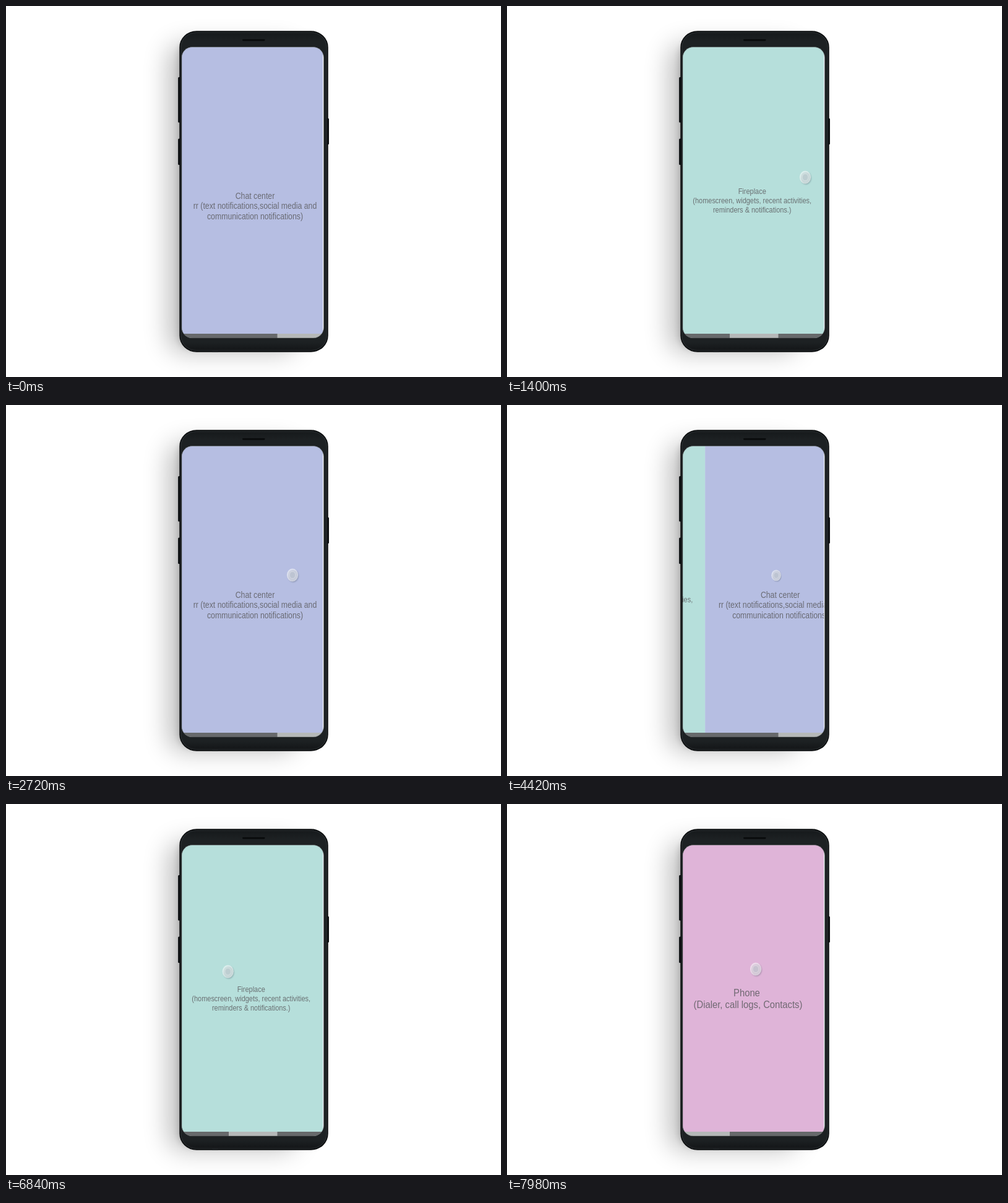
An HTML page that plays this animation: 800 by 600 pixels, repeating every 8 s.

```html
<!DOCTYPE html>
<html lang="en">
<head>
<meta charset="utf-8">
<title>Swipe between phone pages</title>
<style>
  html, body { margin: 0; width: 100%; height: 100%; overflow: hidden; background: #fff; }
  svg { display: block; width: 100vw; height: 100vh; }
  text { font-family: "Liberation Sans", Arial, sans-serif; fill: #5a5a5e; fill-opacity: .84; text-anchor: middle; }
</style>
</head>
<body>
<svg viewBox="0 0 800 600">
  <defs>
    <filter id="wide" x="-50%" y="-30%" width="200%" height="160%"><feGaussianBlur stdDeviation="20"/></filter>
    <filter id="tight" x="-20%" y="-20%" width="140%" height="140%"><feGaussianBlur stdDeviation="5"/></filter>
    <filter id="soft" x="-50%" y="-50%" width="200%" height="200%"><feGaussianBlur stdDeviation="1"/></filter>
    <linearGradient id="shell" x1="0" y1="0" x2="0" y2="1">
      <stop offset="0" stop-color="#15181a"/>
      <stop offset=".03" stop-color="#1d2123"/>
      <stop offset=".97" stop-color="#1d2123"/>
      <stop offset="1" stop-color="#121416"/>
    </linearGradient>
    <clipPath id="screen"><rect x="284" y="66.5" width="229.5" height="470.5" rx="17"/></clipPath>
    <clipPath id="view"><rect x="284" y="66" width="228.2" height="472"/></clipPath>
  </defs>

  <rect width="800" height="600" fill="#fff"/>
  <rect x="262" y="62" width="208" height="498" rx="24" opacity=".25" filter="url(#wide)"/>
  <rect x="277" y="55" width="223" height="501" rx="24" opacity=".12" filter="url(#tight)"/>

  <g fill="#131618">
    <rect x="278" y="115" width="5" height="73.5" rx="1.5"/>
    <rect x="278" y="214.5" width="5" height="42.5" rx="1.5"/>
    <rect x="517" y="181.5" width="5" height="42.5" rx="1.5"/>
  </g>
  <rect x="281" y="41" width="239" height="518" rx="27" ry="26" fill="url(#shell)" stroke="#090b0c" stroke-width="1.4"/>
  <rect x="282.8" y="43" width="235.4" height="514" rx="25" ry="24" fill="none" stroke="#33383b" stroke-width=".6"/>
  <rect x="382" y="53.8" width="36.5" height="2.6" rx="1.3" fill="#080a0b"/>
  <rect x="333" y="558.6" width="10" height="1.4" rx=".7" fill="#2b2e30"/>

  <g clip-path="url(#screen)">
    <rect x="284" y="66" width="230" height="472" fill="#fff"/>
    <g clip-path="url(#view)">
      <g id="strip"></g>
      <rect x="284" y="530" width="229" height="8" fill="#67696b"/>
      <rect id="thumb" y="530" height="8" fill="#b5b8b8"/>
    </g>
  </g>
  <rect x="284" y="66.5" width="229.5" height="470.5" rx="17" fill="none" stroke="#4b5052" stroke-opacity=".55" stroke-width=".8"/>

  <g id="touch">
    <circle cx="1.4" cy="1.4" r="10" fill="#304050" opacity=".32" filter="url(#soft)"/>
    <circle r="10" fill="#fff" fill-opacity=".52" stroke="#fff" stroke-opacity=".45" stroke-width="1.2"/>
    <circle r="5.6" fill="#7890a4" fill-opacity=".13" stroke="#fff" stroke-opacity=".3"/>
  </g>
</svg>
<script>
const LOOP = 8000, PITCH = 231, LEFT = 281, SQUEEZE = 0.86;
const $ = id => document.getElementById(id);
const strip = $('strip'), thumb = $('thumb'), touch = $('touch');

const pages = [
  { fill: '#dfb4d8', x: 108.5, y: 311, step: 19.2, size: 17.2,
    lines: ['Phone\u00a0', '(Dialer, call logs, Contacts)'] },
  { fill: '#b6dfdb', x: 115.2, y: 304.3, step: 14.9, size: 12.75,
    lines: ['Fireplace', '(homescreen, widgets, recent activities,', 'reminders & notifications.)'] },
  { fill: '#b6bee2', x: 121.5, y: 312, step: 16.5, size: 14.3,
    lines: ['Chat center', 'rr (text notifications,social media and', 'communication notifications)'] }
];

function add(parent, tag, attrs) {
  const el = document.createElementNS('http://www.w3.org/2000/svg', tag);
  for (const k in attrs) el.setAttribute(k, attrs[k]);
  return parent.appendChild(el);
}

pages.forEach((p, i) => {
  const g = add(strip, 'g', { transform: `translate(${i * PITCH} 0)` });
  add(g, 'rect', { y: 66, width: PITCH + 0.3, height: 464, fill: p.fill });
  // The screen content is slightly squeezed horizontally
  const block = add(g, 'g', { transform: `translate(${p.x} 0) scale(${SQUEEZE} 1)`, 'font-size': p.size });
  p.lines.forEach((line, n) => {
    add(block, 'text', { y: p.y + n * p.step }).textContent = line;
  });
});

// Keys are [time, value...]; a trailing 'out' eases towards that key
const scrollKeys = [
  [500, 2], [920, 2 - 86 / PITCH], [1300, 1.006, 'out'], [1400, 1],
  [2080, 1], [2260, 1 + 19 / PITCH], [2720, 2, 'out'],
  [4080, 2], [4420, 2 - 39 / PITCH], [4540, 2 - 58 / PITCH], [4880, 1.006, 'out'], [4940, 1],
  [7340, 1], [7660, 1 - 93 / PITCH], [7980, 0, 'out']
];
const touchKeys = [
  [500, 396, 276], [920, 482, 277], [2080, 482, 277], [2260, 463, 275],
  [3500, 463, 275], [3940, 396, 276], [4080, 396, 276], [4420, 435, 275.5], [4540, 454, 275],
  [6060, 454, 275], [6240, 394, 273.5], [6380, 394, 273.5], [6580, 361, 272],
  [6820, 361, 272], [6840, 359, 271], [6940, 332, 271.5],
  [7080, 332, 271.5], [7100, 309, 271.5], [7340, 309, 271.5], [7660, 402, 267]
];
const drags = [[500, 920], [2080, 2260], [4080, 4540], [7340, 7660]];

const clamp = v => Math.max(0, Math.min(1, v));

function sample(keys, t, col = 1) {
  const n = keys.findIndex(k => k[0] > t);
  if (n === 0) return keys[0][col];
  if (n < 0) return keys[keys.length - 1][col];
  const a = keys[n - 1], b = keys[n];
  let u = (t - a[0]) / (b[0] - a[0]);
  if (b.includes('out')) u = 1 - (1 - u) ** 3;
  return a[col] + (b[col] - a[col]) * u;
}

function press(t) {
  return Math.max(...drags.map(([from, to]) =>
    Math.min(clamp((t - from + 80) / 80), clamp((to + 80 - t) / 80))));
}

function draw(t) {
  const pos = sample(scrollKeys, t);
  strip.setAttribute('transform', `translate(${LEFT - pos * PITCH} 0)`);

  const edges = [284, 360, 438.5, 513];
  const page = Math.round(pos);
  thumb.setAttribute('x', edges[page]);
  thumb.setAttribute('width', edges[page + 1] - edges[page]);

  const s = 1 - 0.14 * press(t);
  touch.setAttribute('transform',
    `translate(${sample(touchKeys, t, 1)} ${sample(touchKeys, t, 2)}) scale(${SQUEEZE * s} ${s})`);
  touch.setAttribute('opacity', clamp((t - 20) / 340));
}

const start = performance.now();
function tick() {
  draw((performance.now() - start) % LOOP);
  requestAnimationFrame(tick);
}
tick();
</script>
</body>
</html>
```
